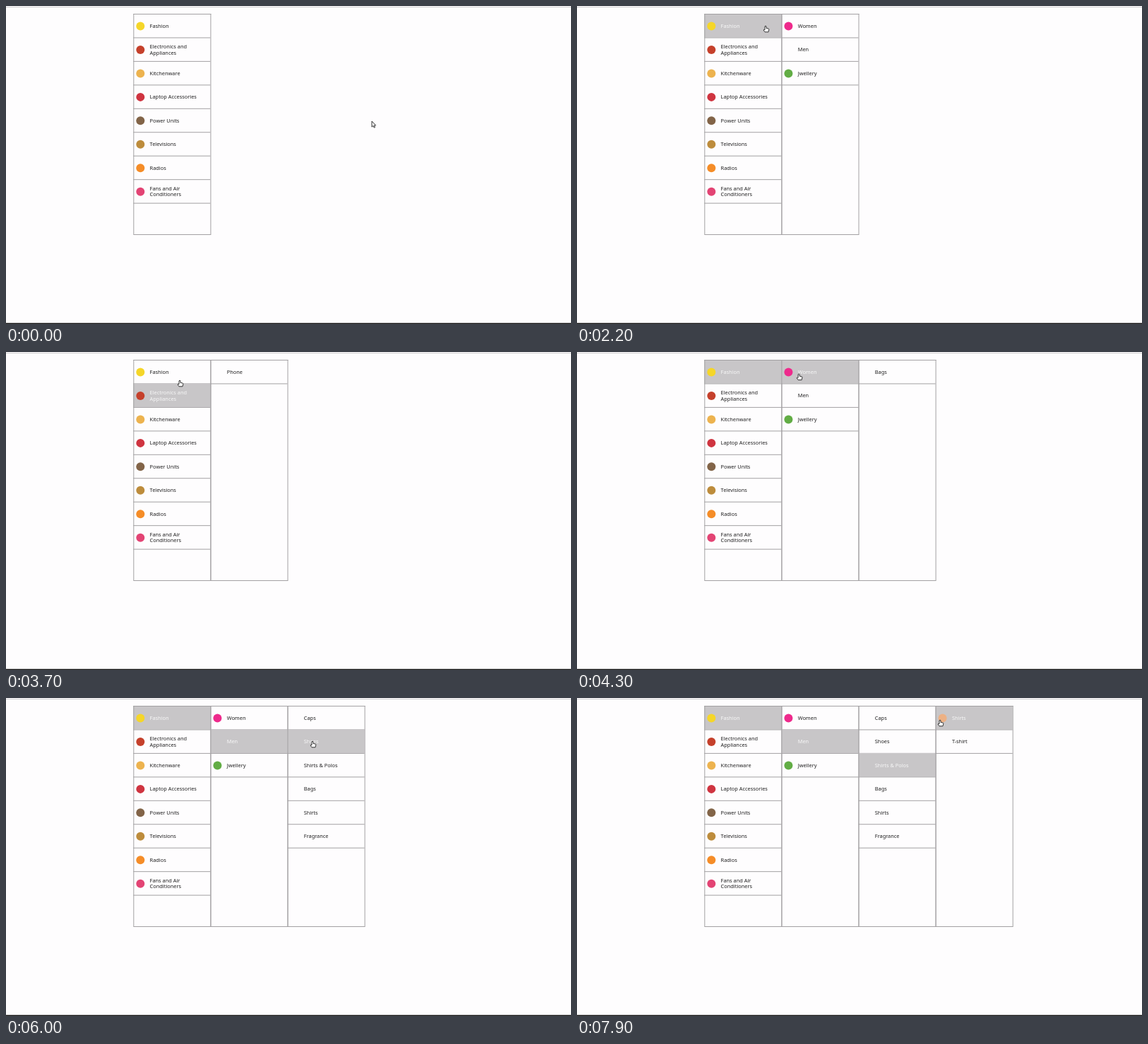
An HTML page with a canvas for the animation above (8 s loop, 800 by 450 pixels).

```html
<!DOCTYPE html>
<html lang="en">
<head>
<meta charset="utf-8">
<title>Cascading category menu</title>
<style>
  html, body { margin: 0; width: 100%; height: 100%; overflow: hidden; background: #fefdfe; }
  canvas { display: block; }
</style>
</head>
<body>
<canvas id="stage" width="800" height="450"></canvas>
<script>
const ctx = document.getElementById('stage').getContext('2d');
const LOOP = 8000, STEP = 100;
const LEFT = 180.3, TOP = 11, BOTTOM = 323, COLUMN = 109.1, ROW = 33.45;
const LINE = '#a3a1a3', HOVER = '#c8c6c8', PAPER = '#fefdfe', INK = '#202020';

const item = (label, icon, children) => ({ label, icon, children });

const polos = [item('Shirts', '#edb184'), item('T-shirt')];
const men = [
  item('Caps'), item('Shoes'), item('Shirts & Polos', null, polos),
  item('Bags'), item('Shirts'), item('Fragrance')
];
const fashion = [
  item('Women', '#ee2a8c', [item('Bags')]),
  item('Men', null, men),
  item('Jwellery', '#62ad45', [item('Ring')])
];
const menu = [
  item('Fashion', '#f5d629', fashion),
  item('Electronics and\nAppliances', '#c5402b', [item('Phone')]),
  item('Kitchenware', '#edb34f'),
  item('Laptop Accessories', '#cf3440'),
  item('Power Units', '#826448'),
  item('Televisions', '#bd8c3c'),
  item('Radios', '#f58d28'),
  item('Fans and Air\nConditioners', '#e34474')
];

// The pointer rests between moves: leave, arrive, x, y.
const home = { x: 518, y: 163 };
const moves = [
  [1200, 1500, 422, 122],
  [1700, 2200, 267, 28],
  [2800, 3400, 246, 60],
  [3500, 3900, 246, 20],
  [3900, 4400, 322, 32],
  [4400, 4700, 325, 80],
  [5000, 5500, 322, 62],
  [5700, 6000, 434, 61],
  [6400, 6800, 438, 94],
  [7100, 7500, 572, 63],
  [7700, 7850, 514, 31]
];

const arrow = new Path2D('M0 0V8.2L1.9 6.5 3.2 9.2 4.5 8.6 3.3 6H5.6Z');
const hand = new Path2D('M-1 5V.8Q0-.5 1 .8V3.4L4 4Q5 4.2 4.8 5.3L4 8.8H-1L-3 6Q-2.7 4.8-1 5.6Z');

const lineX = column => LEFT + COLUMN * column;
const lineY = row => TOP + ROW * row;
const smooth = k => k * k * (3 - 2 * k);

function pointerAt(time) {
  let { x, y } = home;
  for (const [leave, arrive, toX, toY] of moves) {
    if (time <= leave) break;
    const k = smooth(Math.min(1, (time - leave) / (arrive - leave)));
    x += (toX - x) * k;
    y += (toY - y) * k;
  }
  return { x, y };
}

function openColumns(path) {
  const columns = [menu];
  for (const row of path) {
    const { children } = columns.at(-1)[row];
    if (children) columns.push(children);
  }
  return columns;
}

// Replays the pointer; the menu reacts one step late.
function hoveredPath(time) {
  let path = [];
  for (let t = 0; t < time; t += STEP) {
    const { x, y } = pointerAt(t);
    const column = Math.floor((x - LEFT) / COLUMN);
    const row = Math.floor((y - TOP) / ROW);
    if (openColumns(path)[column]?.[row]) path = [...path.slice(0, column), row];
  }
  return path;
}

function rect(color, x, y, w, h) {
  ctx.fillStyle = color;
  ctx.fillRect(x, y, w, h);
}

function drawIcon(color, x, y) {
  ctx.fillStyle = color;
  ctx.beginPath();
  ctx.arc(x, y, 6, 0, 2 * Math.PI);
  ctx.fill();
}

function drawColumn(items, column, hovered) {
  const left = lineX(column);
  items.forEach(({ label, icon }, row) => {
    const y = lineY(row), middle = y + ROW / 2;
    const active = row === hovered;
    if (active) rect(HOVER, left, y, COLUMN, ROW);
    rect(LINE, left, y + ROW, COLUMN, 1);
    if (icon) drawIcon(icon, left + 10, middle + .8);
    const lines = label.split('\n');
    ctx.fillStyle = active ? '#f8f8f8' : INK;
    lines.forEach((text, i) =>
      ctx.fillText(text, left + 23.3, middle + 3.2 + 8.5 * (i - (lines.length - 1) / 2)));
  });
  for (const y of [TOP, BOTTOM]) rect(LINE, left, y, COLUMN + 1, 1);
  for (const x of [left, left + COLUMN]) rect(LINE, x, TOP, 1, BOTTOM - TOP);
}

function drawPointer({ x, y }, shape) {
  ctx.save();
  ctx.translate(x, y);
  ctx.lineJoin = 'round';
  ctx.strokeStyle = '#333';
  ctx.fillStyle = '#fff';
  ctx.fill(shape);
  ctx.stroke(shape);
  ctx.restore();
}

function draw(now) {
  const time = Math.floor(now % LOOP / STEP) * STEP;
  const path = hoveredPath(time);

  rect(PAPER, 0, 0, 800, 450);
  rect('#cfcdcf', 0, 1, 800, 1);
  rect('#111', 0, 448.6, 800, 1.4);
  ctx.font = '7.38px "Noto Sans", "Open Sans", sans-serif';
  openColumns(path).forEach((items, column) => drawColumn(items, column, path[column]));
  drawPointer(pointerAt(time), path.length ? hand : arrow);
  requestAnimationFrame(draw);
}
requestAnimationFrame(draw);
</script>
</body>
</html>
```
